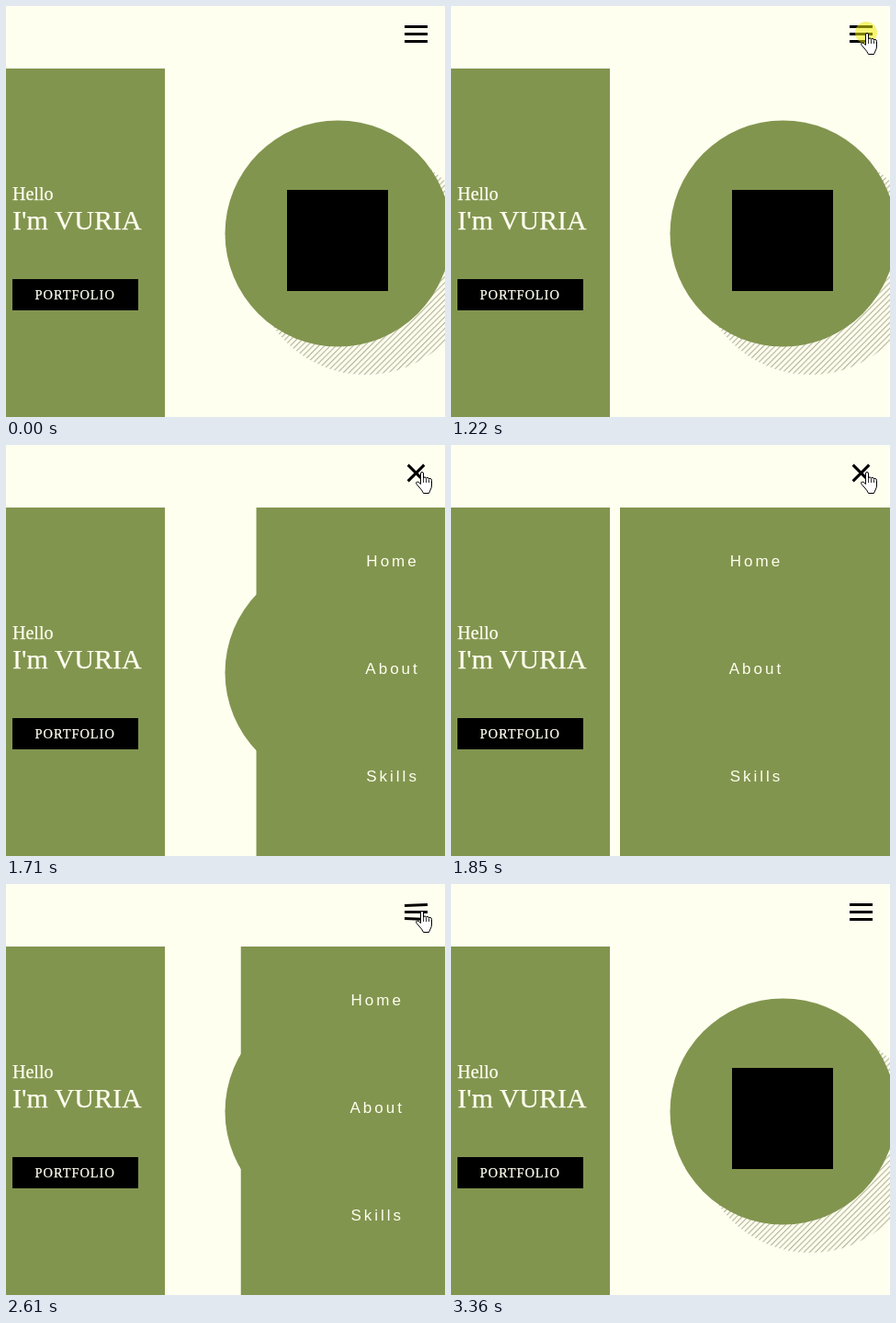
Animation of 478x447 px, one loop 3.95 s. Source, as an HTML page:

```html
<!DOCTYPE html>
<html lang="en">
<head>
<meta charset="utf-8">
<title>Sliding menu</title>
<style>
  html, body { margin: 0; width: 100%; height: 100%; overflow: hidden; background: #fffff0; }
  svg { display: block; }
  .ivory { fill: #fffff0; font-family: "Liberation Serif", serif; }
  .heavy { stroke: #fffff0; stroke-width: .25; }
  #panel text { font: 17px "Liberation Sans", sans-serif; letter-spacing: 3px; text-anchor: middle; }
  .green { fill: #82954f; }
</style>
</head>
<body>
<svg width="478" height="447" viewBox="0 0 478 447">
  <defs>
    <pattern id="hatch" width="4.4" height="4" patternUnits="userSpaceOnUse" patternTransform="rotate(45)">
      <rect width="1.1" height="4" fill="#b3b299"/>
    </pattern>
  </defs>
  <rect width="478" height="447" fill="#fffff0"/>

  <circle cx="391.5" cy="278" r="123" fill="url(#hatch)"/>
  <circle class="green" cx="361.5" cy="247.5" r="123"/>
  <rect x="306" y="200" width="110" height="110"/>

  <rect class="green" y="68" width="173" height="379"/>
  <rect x="7" y="297" width="137" height="34"/>
  <g class="ivory heavy">
    <text x="7" y="211" font-size="20">Hello</text>
    <text x="7" y="243" font-size="30">I'm VURIA</text>
    <text x="31.5" y="319" font-size="14.4" letter-spacing="1">PORTFOLIO</text>
  </g>

  <g id="panel">
    <rect class="green" y="68" width="300" height="379"/>
    <g class="ivory">
      <text x="148.5" y="132">Home</text>
      <text x="148.5" y="249">About</text>
      <text x="148.5" y="366">Skills</text>
    </g>
  </g>

  <rect id="top" x="-12.5" y="-1.5" width="25" height="3"/>
  <rect id="middle" x="434" y="29" width="25" height="3"/>
  <rect id="bottom" x="-12.5" y="-1.5" width="25" height="3"/>

  <circle id="press" cx="452" cy="29" r="12" fill="#ebeb00" fill-opacity=".52"/>
  <g id="cursor" fill="#fff" stroke="#000" stroke-linejoin="round">
    <path d="M5.500 13.500V2a1.500 1.500 0 0 1 3 0V7q.2-1 1.500-1t1.500 1.300q.2-.8 1.500-.8t1.500 1.500q.2-.6 1.500-.5 1.500.2 1.500 2V15q0 2.500-1.500 5L14.500 23.500H8.500Q7 20 4 17L1 13.500Q0 11.500 1.500 11 3 10.500 5.500 13.500Z"/>
    <path fill="none" stroke-width=".8" d="M8.500 7v5M11.500 7.500v4.500M14.500 8.500v3.500"/>
  </g>
</svg>
<script>
const LOOP = 3950, TICK = 70;
const OPEN_AT = 1293, CLOSE_AT = 2387;
const TRAVEL = 294, SLIDE = 518, TURN = 310;

const part = id => document.getElementById(id);
const [panel, topBar, middleBar, bottomBar, press, cursor] =
  ["panel", "top", "middle", "bottom", "press", "cursor"].map(part);
const clamp = v => Math.min(1, Math.max(0, v));
const place = (el, x, y, angle = 0) =>
  el.setAttribute("transform", `translate(${x} ${y}) rotate(${angle})`);
const show = (el, on) => el.setAttribute("visibility", on ? "visible" : "hidden");

// CSS-style cubic-bezier timing, solved by bisection
function bezier(x1, y1, x2, y2) {
  const axis = (a, b, u) => 3 * a * u * (1 - u) ** 2 + 3 * b * u * u * (1 - u) + u ** 3;
  return x => {
    if (x <= 0 || x >= 1) return clamp(x);
    let low = 0, high = 1;
    for (let i = 0; i < 24; i++) {
      const mid = (low + high) / 2;
      if (axis(x1, x2, mid) < x) low = mid; else high = mid;
    }
    return axis(y1, y2, low);
  };
}
const ease = bezier(.25, .1, .25, 1);
const easeIn = bezier(.42, 0, 1, 1);

// The screen refreshes in ticks, counted from the start of each action
function snap(t) {
  const base = [2400, 1220, 200, 0].find(start => t >= start);
  return base + Math.floor((t - base) / TICK) * TICK;
}

function openness(t, duration, curve) {
  return t < CLOSE_AT
    ? curve((t - OPEN_AT) / duration)
    : 1 - curve((t - CLOSE_AT) / duration);
}

function draw(time) {
  const t = snap(time);
  place(panel, 478 - TRAVEL * openness(t, SLIDE, easeIn), 0);

  const turn = openness(t, TURN, ease);
  place(topBar, 446.5, 22.5 + 8 * turn, -45 * turn);
  place(bottomBar, 446.5, 38.5 - 8 * turn, 45 * turn);
  middleBar.setAttribute("opacity", 1 - turn);

  const away = clamp((410 - t) / 210);
  place(cursor, 446 + 26 * away ** 1.5, 29 + 2 * away);
  show(cursor, time >= 200 && time < 3360);
  show(press, (time >= 1220 && time < 1290) || (time >= 2250 && time < 2400));
}

let start;
function loop(now) {
  start ??= now;
  draw((now - start) % LOOP);
  requestAnimationFrame(loop);
}
draw(0);
requestAnimationFrame(loop);
</script>
</body>
</html>
```
